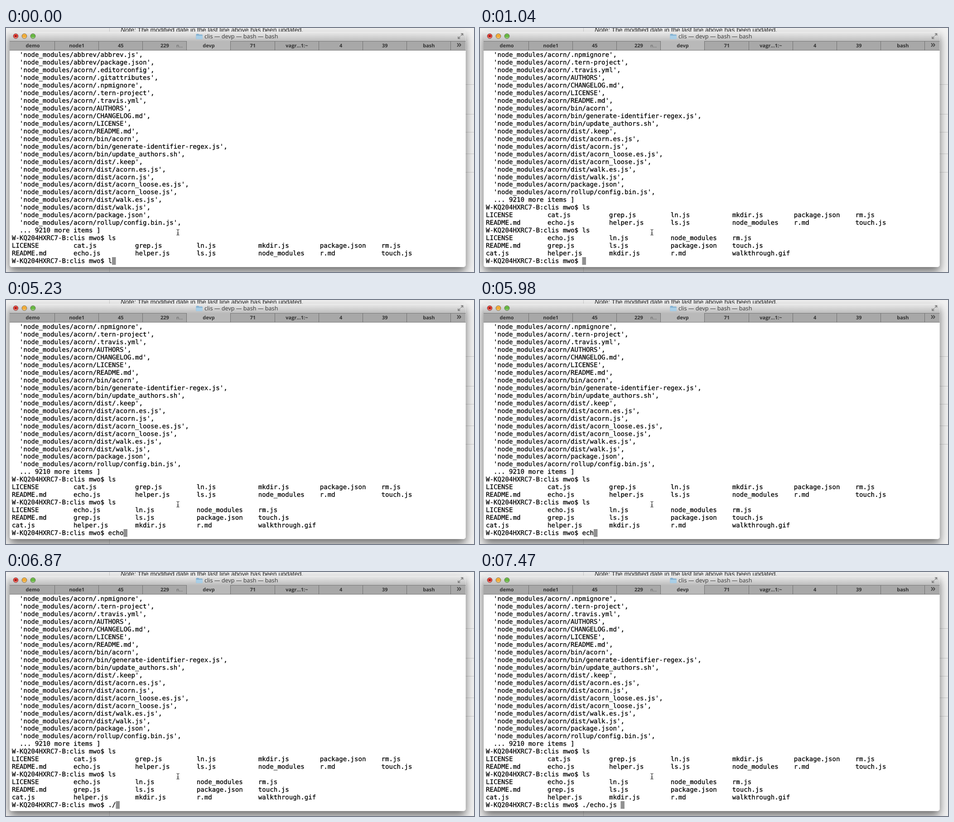
Animation of 1033x542 px, one loop 8 s. Source, as an HTML page:

```html
<!DOCTYPE html>
<html lang="en">
<head>
<meta charset="utf-8">
<title>Terminal</title>
<style>
  html, body { margin: 0; width: 100%; height: 100%; overflow: hidden; background: #f2f2f2; }
  svg { display: block; width: 100%; height: 100%; }
  text { text-rendering: geometricPrecision; }
  .page { font: 14.1px "Liberation Sans", Arial, sans-serif; fill: #222; }
  .title { font: 12.7px "Open Sans", sans-serif; fill: #333; }
  .tabs text { font: bold 11px "Open Sans", sans-serif; fill: #333; text-anchor: middle; }
  .tabs .small { font-weight: normal; font-size: 10px; fill: #555; }
  .tabs .more { font-weight: 600; font-size: 20px; fill: #444; }
  #screen text { font: 14.11px "DejaVu Sans Mono", monospace; white-space: pre;
    fill: #000; stroke: #000; stroke-width: .3px; }
</style>
</head>
<body>
<svg viewBox="0 0 1033 542" xml:space="preserve">
  <defs>
    <linearGradient id="bar" x2="0" y2="1">
      <stop offset="0" stop-color="#ececec"/><stop offset="1" stop-color="#bdbdbd"/>
    </linearGradient>
    <linearGradient id="shine" x2="0" y2="1">
      <stop offset="0" stop-color="#fff" stop-opacity=".15"/>
      <stop offset=".5" stop-color="#fff" stop-opacity="0"/>
      <stop offset="1" stop-color="#fff" stop-opacity=".4"/>
    </linearGradient>
    <filter id="shadow" x="-10%" y="-10%" width="120%" height="125%">
      <feDropShadow dx="0" dy="10" stdDeviation="10" flood-color="#000" flood-opacity=".55"/>
    </filter>
    <clipPath id="frame"><rect x="8" y="8" width="1006.5" height="523" rx="5"/></clipPath>
  </defs>

  <rect width="1033" height="542" fill="#f2f2f2"/>
  <path d="M228.500 0V542M1000 125.500h33M1000 191.500h33M1000 231.500h33M1000 279.500h33M1000 320.500h33" stroke="#ccc"/>
  <text class="page" x="253" y="9"><tspan font-style="italic">Note:</tspan> The modified date in the last line above has been updated.</text>

  <rect x="8" y="8" width="1006.500" height="523" rx="5" fill="#fff" filter="url(#shadow)"/>
  <g clip-path="url(#frame)">
    <rect x="8" y="8" width="1007" height="21" fill="url(#bar)"/>
    <rect x="8" y="29" width="1007" height="21" fill="#a8a8a8"/>
    <rect x="399" y="29" width="97" height="21" fill="#b9b9b9"/>
    <path d="M8 29.500H399M496 29.500H1015M8 49.500H1015" stroke="#777"/>
  </g>

  <g id="lights"></g>
  <path d="M419.500 14.500q0-1.500 1.500-1.500h4l1.500 1.500h6q1.500 0 1.500 1.500v7.500q0 1-1 1h-12.500q-1 0-1-1z" fill="#86b3d3"/>
  <path d="M419.500 17h14.500v6.500q0 1-1 1h-12.500q-1 0-1-1z" fill="#a9cfe7"/>
  <text class="title" x="438" y="22.700">clis — devp — bash — bash</text>
  <path d="M1004 17l4.500-4.500M1004 12.500h4.500v4.500M1002.500 19l-4.500 4.500M998 19v4.500h4.500" fill="none" stroke="#777" stroke-width="1.500"/>
  <g class="tabs" id="tabs"></g>

  <g id="screen"><rect id="cursor" y="509" width="8.500" height="17" fill="#919191"/></g>
  <path id="beam" d="M376.500 447.500q3 0 3 2v8.500q0 2-3 2M382.500 447.500q-3 0-3 2v8.500q0 2 3 2M377.500 455.500h4" fill="none" stroke="#222" stroke-width="1.100"/>
</svg>

<script>
const CELL = 8.495, LEFT = 13.1, PITCH = 16.963, ROWS = 28, FIRST_BASELINE = 64.1;
const LOOP = 8000;
const PROMPT = 'W-KQ204HXRC7-B:clis mwo$ ';
const $ = id => document.getElementById(id);

function add(parent, tag, attrs, content = '') {
  const el = document.createElementNS('http://www.w3.org/2000/svg', tag);
  for (const [key, value] of Object.entries(attrs)) el.setAttribute(key, value);
  el.textContent = content;
  return parent.appendChild(el);
}

const columns = names => names.split(' ').map(name => name.padEnd(16)).join('').trimEnd();

const modules = `abbrev/abbrev.js abbrev/package.json
  acorn/.editorconfig acorn/.gitattributes acorn/.npmignore acorn/.tern-project
  acorn/.travis.yml acorn/AUTHORS acorn/CHANGELOG.md acorn/LICENSE acorn/README.md
  acorn/bin/acorn acorn/bin/generate-identifier-regex.js acorn/bin/update_authors.sh
  acorn/dist/.keep acorn/dist/acorn.es.js acorn/dist/acorn.js
  acorn/dist/acorn_loose.es.js acorn/dist/acorn_loose.js
  acorn/dist/walk.es.js acorn/dist/walk.js
  acorn/package.json acorn/rollup/config.bin.js`.split(/\s+/);

const log = [
  ...modules.map(path => `  'node_modules/${path}',`),
  '  ... 9210 more items ]',
  PROMPT + 'ls',
  columns('LICENSE cat.js grep.js ln.js mkdir.js package.json rm.js'),
  columns('README.md echo.js helper.js ls.js node_modules r.md touch.js'),
  PROMPT + 'ls',
  columns('LICENSE echo.js ln.js node_modules rm.js'),
  columns('README.md grep.js ls.js package.json touch.js'),
  columns('cat.js helper.js mkdir.js r.md walkthrough.gif'),
];

// Start time in ms and the command typed so far.
const typing = [
  [0, 'l'], [150, ''], [900, 'ls'], [1040, ''],
  [4940, 'e'], [5090, 'ec'], [5230, 'echo'],
  [5980, 'ech'], [6130, 'ec'], [6280, 'e'], [6420, ''],
  [6720, '.'], [6870, './'], [7170, './e'], [7320, './ech'], [7470, './echo.js '],
];
const LISTED_AT = 1040, LISTED_ROWS = 4;

['#e2352c', '#f0a72c', '#5fb336'].forEach((fill, i) => {
  const at = { cx: 21.5 + 19 * i, cy: 18 };
  add($('lights'), 'circle', { ...at, r: 5.5, fill, stroke: '#555', 'stroke-opacity': .7 });
  add($('lights'), 'circle', { ...at, r: 5, fill: 'url(#shine)' });
});
add($('lights'), 'circle', { cx: 21.5, cy: 18, r: 1.8, fill: '#6b0f0c' });

['demo', 'node1', '45', '229', 'devp', '71', 'vagr...1:~', '4', '39', 'bash'].forEach((label, i) => {
  add($('tabs'), 'text', { x: 59 + 97.15 * i, y: 43.3 }, label);
  add($('tabs'), 'path', { d: `M${Math.round(108 + 97.1 * i) - .5} 29v21`, stroke: '#707070' });
});
add($('tabs'), 'text', { x: 383, y: 43.3, class: 'small' }, 'n...');
add($('tabs'), 'text', { x: 1000, y: 42.5, class: 'more' }, '»');

const beam = $('beam'), halo = beam.cloneNode();
halo.removeAttribute('id');
halo.setAttribute('stroke', '#fff');
halo.setAttribute('stroke-width', 2.6);
beam.before(halo);

const rows = Array.from({ length: ROWS }, (_, i) =>
  add($('screen'), 'text', { x: LEFT, y: FIRST_BASELINE + PITCH * i }));

let shown = -1;
function render(time) {
  const t = time % LOOP;
  const step = typing.findLastIndex(([start]) => t >= start);
  if (step !== shown) {
    shown = step;
    const [start, command] = typing[step];
    const scroll = start >= LISTED_AT ? LISTED_ROWS : 0;
    const line = PROMPT + command;
    rows.forEach((row, i) => {
      row.textContent = i === ROWS - 1 ? line : log[i + scroll];
    });
    $('cursor').setAttribute('x', LEFT + CELL * line.length);
  }
}

const origin = performance.now();
function tick() {
  render(performance.now() - origin);
  requestAnimationFrame(tick);
}
tick();
</script>
</body>
</html>
```
